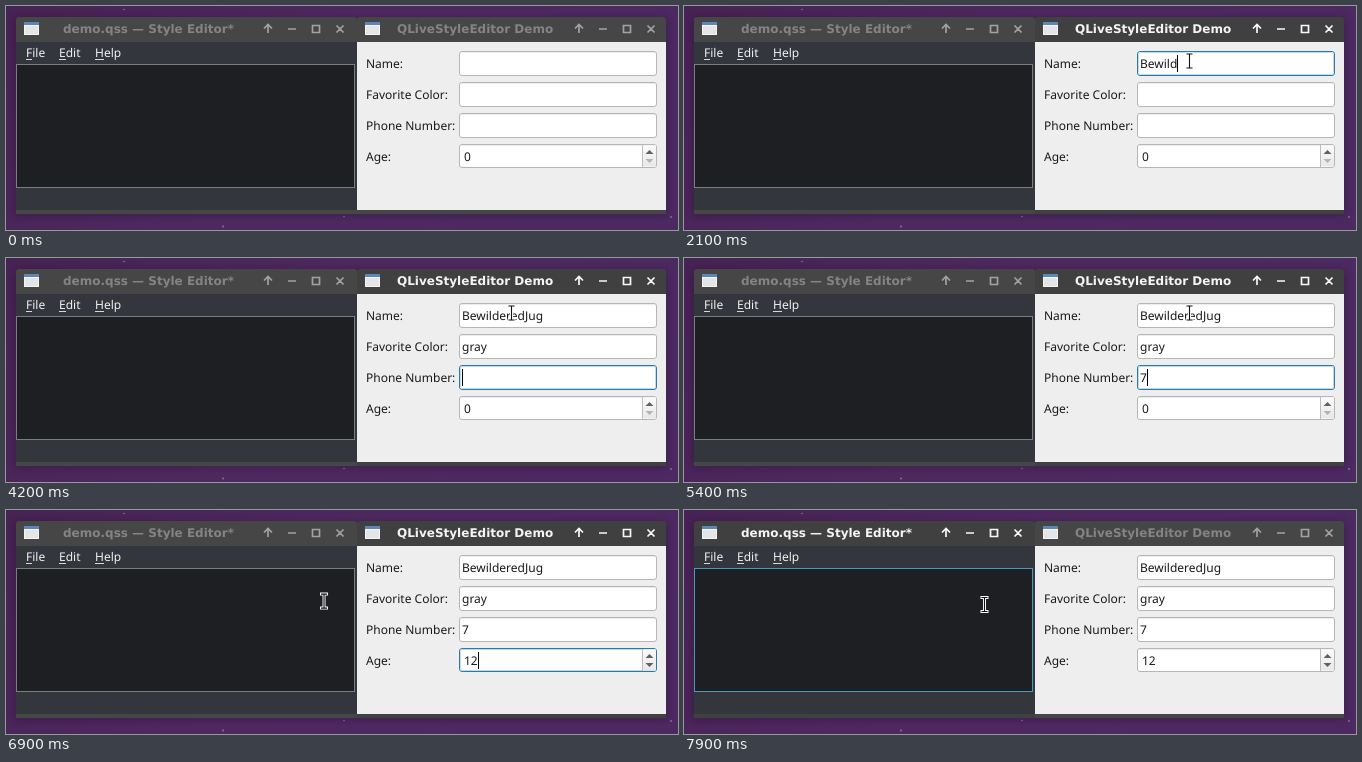
Write an HTML page that moves like this. It is 672 px wide and 224 px high and loops after 8000 ms.

```html
<!DOCTYPE html>
<html lang="en">
<head>
<meta charset="utf-8">
<title>Style editor demo</title>
<style>
  html, body { margin: 0; width: 100%; height: 100%; overflow: hidden; background: #4a2459; }
  svg { display: block; }
  text { font: 12px "Noto Sans", sans-serif; fill: #1a1a1a; white-space: pre; text-rendering: geometricPrecision; }
  .title { font: bold 12px "DejaVu Sans", sans-serif; }
  .menu { fill: #eff0f1; }
</style>
</head>
<body>
<svg id="stage" width="672" height="224" viewBox="0 0 672 224">
  <defs>
    <linearGradient id="sky" x2="1" y2=".25">
      <stop offset="0" stop-color="#472355"/>
      <stop offset=".5" stop-color="#4e2960"/>
      <stop offset="1" stop-color="#4d2962"/>
    </linearGradient>
    <linearGradient id="button" x2="0" y2="1">
      <stop offset="0" stop-color="#fbfbfb"/>
      <stop offset="1" stop-color="#e8e8e8"/>
    </linearGradient>
    <filter id="blur" x="-10%" y="-10%" width="120%" height="120%"><feGaussianBlur stdDeviation="4"/></filter>
  </defs>
</svg>
<script>
const LOOP = 8000, BLINK = 700;
const svg = document.getElementById('stage');

function el(tag, attrs, parent = svg) {
  const node = document.createElementNS('http://www.w3.org/2000/svg', tag);
  for (const key in attrs) node.setAttribute(key, attrs[key]);
  return parent.appendChild(node);
}
function rect(x, y, width, height, fill, more = {}, parent = svg) {
  return el('rect', { x, y, width, height, fill, ...more }, parent);
}
function label(x, y, string, cls = '', parent = svg) {
  const node = el('text', { x, y, class: cls }, parent);
  node.textContent = string;
  return node;
}

// Desktop
rect(0, 0, 672, 224, 'url(#sky)');
for (const [cx, cy, r] of [[118, 3.5, .8], [217, 220.5, .9], [338, 210.5, .8], [665, 211, .9]])
  el('circle', { cx, cy, r, fill: '#8f74a0' });
rect(9, 12, 652, 197, '#150a1c', { opacity: .35, filter: 'url(#blur)' });

function makeWindow(x, w, titleX, title, buttonX, body) {
  const bar = el('path', { d: `M${x} 208V14q0-3 3-3H${x + w - 3}q3 0 3 3V208Z` });
  rect(x, 36, w, 168, body);
  rect(x + 8, 16, 15, 13, '#f4f4f4');
  rect(x + 8, 16, 15, 3, '#5d86b8');
  rect(x + 9, 20, 13, 8, '#e3e5e7');
  const text = label(titleX, 27, title, 'title');
  const buttons = el('g', { fill: 'none', 'stroke-width': 1.7 });
  const [up, min, max, close] = [0, 24, 48, 72].map(d => buttonX + d);
  el('path', {
    d: `M${up} 27V19M${up - 4} 22.5L${up} 18.5L${up + 4} 22.5M${min - 4} 23H${min + 4}` +
       `M${max - 3.5} 19.5h7v7h-7ZM${close - 3.5} 19.5l7 7m0-7l-7 7`
  }, buttons);
  const mix = (a, b, k) => { const v = Math.round(a + (b - a) * k); return `rgb(${v},${v},${v})`; };
  return active => {
    bar.setAttribute('fill', mix(70, 64, active));
    text.style.fill = mix(132, 244, active);
    buttons.setAttribute('stroke', mix(162, 248, active));
  };
}

const setLeft = makeWindow(10, 341, 57, 'demo.qss — Style Editor*', 262, '#33363c');
const setRight = makeWindow(351, 309, 391, 'QLiveStyleEditor Demo', 573, '#eeeeee');

// Editor window
for (const [x, name, w] of [[20, 'File', 6], [53, 'Edit', 7], [89, 'Help', 9]]) {
  label(x, 51, name, 'menu');
  rect(x, 53, w, 1, '#d6d8da');
}
const editor = rect(10.5, 58.5, 338, 123, '#1d1f23');

// Form window
const fields = ['Name:', 'Favorite Color:', 'Phone Number:', 'Age:'].map((name, i) => {
  const spin = i === 3, y = 45 + 31 * i, x = spin ? 458 : 456, h = spin ? 23 : 24;
  label(360, y + 17, name);
  const box = rect(453.5, y + .5, 197, h, '#fff', { rx: 2.5 });
  rect(455, y + 1, 194, 1, '#ededed');
  const glow = rect(454.5, y + 1.5, 195, h - 2, 'none', { rx: 2, stroke: '#bedbed' });
  return { x, y, box, glow };
});
rect(637, 139.5, 13, 21, 'url(#button)');
rect(636, 139, 1, 22, '#bdbdbd');
el('path', { d: 'M639.5 148L643.5 144L647.5 148Z', fill: '#606060' });
const down = el('path', { d: 'M639.5 153L643.5 157L647.5 153Z' });
const selection = rect(457, 142, 8, 17, '#308cc6');
for (const f of fields) f.text = label(f.x, f.y + 17, '');
const caret = rect(0, 0, 1, 17, '#000');

// Pointer
const pointer = el('g', {});
const beam = el('g', { fill: 'none' }, pointer);
for (const [stroke, width] of [['#fff', 3], ['#111', 1.1]])
  el('path', { d: 'M-2.5-7H2.5M0-7V7M-2.5 7H2.5', stroke, 'stroke-width': width, 'stroke-linecap': 'square' }, beam);
const arrow = el('path', {
  d: 'M0 0V14.5L3.7 11.2L6.2 16.4L8.4 15.4L6 10.3H10.6Z', fill: '#222', stroke: '#fff'
}, pointer);

// Timelines: [time, value]
const focusSteps = [[0, -1], [800, 0], [3000, 1], [4200, 2], [5600, 3], [7300, -1]];
const typing = [
  [[0, ''], [1500, 'B'], [1800, 'Be'], [1900, 'Bew'], [2000, 'Bewil'], [2100, 'Bewild'],
   [2200, 'Bewilder'], [2300, 'Bewildered'], [2600, 'BewilderedJu'], [2700, 'BewilderedJug']],
  [[0, ''], [3700, 'g'], [3800, 'gr'], [4000, 'gra'], [4100, 'gray']],
  [[0, ''], [5300, '7']],
  [[0, '0'], [6100, '1'], [6300, '12']]
];
const path = [[0, 492, 245], [100, 492, 245], [700, 505.5, 55], [6450, 505.5, 55], [7000, 300.5, 94.5]];

const stepAt = (steps, t) => steps.findLast(s => s[0] <= t);
const ramp = (t, a, b) => Math.min(1, Math.max(0, (t - a) / (b - a)));

function pointerAt(t) {
  const i = path.findLastIndex(p => p[0] <= t), a = path[i], b = path[i + 1] || a;
  const u = a === b ? 0 : ramp(t, a[0], b[0]), k = u * u * (3 - 2 * u);
  return [a[1] + (b[1] - a[1]) * k, a[2] + (b[2] - a[2]) * k];
}

function render(t) {
  const swap = ramp(t, 7210, 7380);
  setLeft(swap);
  setRight(ramp(t, 800, 910) * (1 - swap));
  editor.setAttribute('stroke', t >= 7100 ? '#4799be' : '#7b7e81');

  const [focusTime, focus] = stepAt(focusSteps, t);
  const selected = t >= 5600 && t < 6100;
  let caretOn = false;
  fields.forEach((f, i) => {
    const on = i === focus, [typed, value] = stepAt(typing[i], t);
    f.box.setAttribute('stroke', on ? '#2f78a6' : '#b6b6b6');
    f.glow.setAttribute('visibility', on ? 'visible' : 'hidden');
    if (f.text.textContent !== value) f.text.textContent = value;
    if (on && !selected && t - Math.max(typed, focusTime) < BLINK) {
      caretOn = true;
      caret.setAttribute('x', Math.round(f.x + (value ? f.text.getComputedTextLength() : 0)));
      caret.setAttribute('y', f.y + 4);
    }
  });
  caret.setAttribute('visibility', caretOn ? 'visible' : 'hidden');
  selection.setAttribute('visibility', selected ? 'visible' : 'hidden');
  fields[3].text.style.fill = selected ? '#fff' : '';
  down.setAttribute('fill', t < 6100 ? '#b4b4b4' : '#606060');

  const [x, y] = pointerAt(t);
  const overField = x > 453 && x < 651 && fields.some(f => y > f.y && y < f.y + 25);
  const overText = overField || (x > 10 && x < 350 && y > 58 && y < 182);
  pointer.setAttribute('transform', `translate(${x} ${y})`);
  beam.setAttribute('visibility', overText ? 'visible' : 'hidden');
  arrow.setAttribute('visibility', overText ? 'hidden' : 'visible');
}

const start = performance.now();
function tick() {
  render((performance.now() - start) % LOOP);
  requestAnimationFrame(tick);
}
tick();
</script>
</body>
</html>
```
